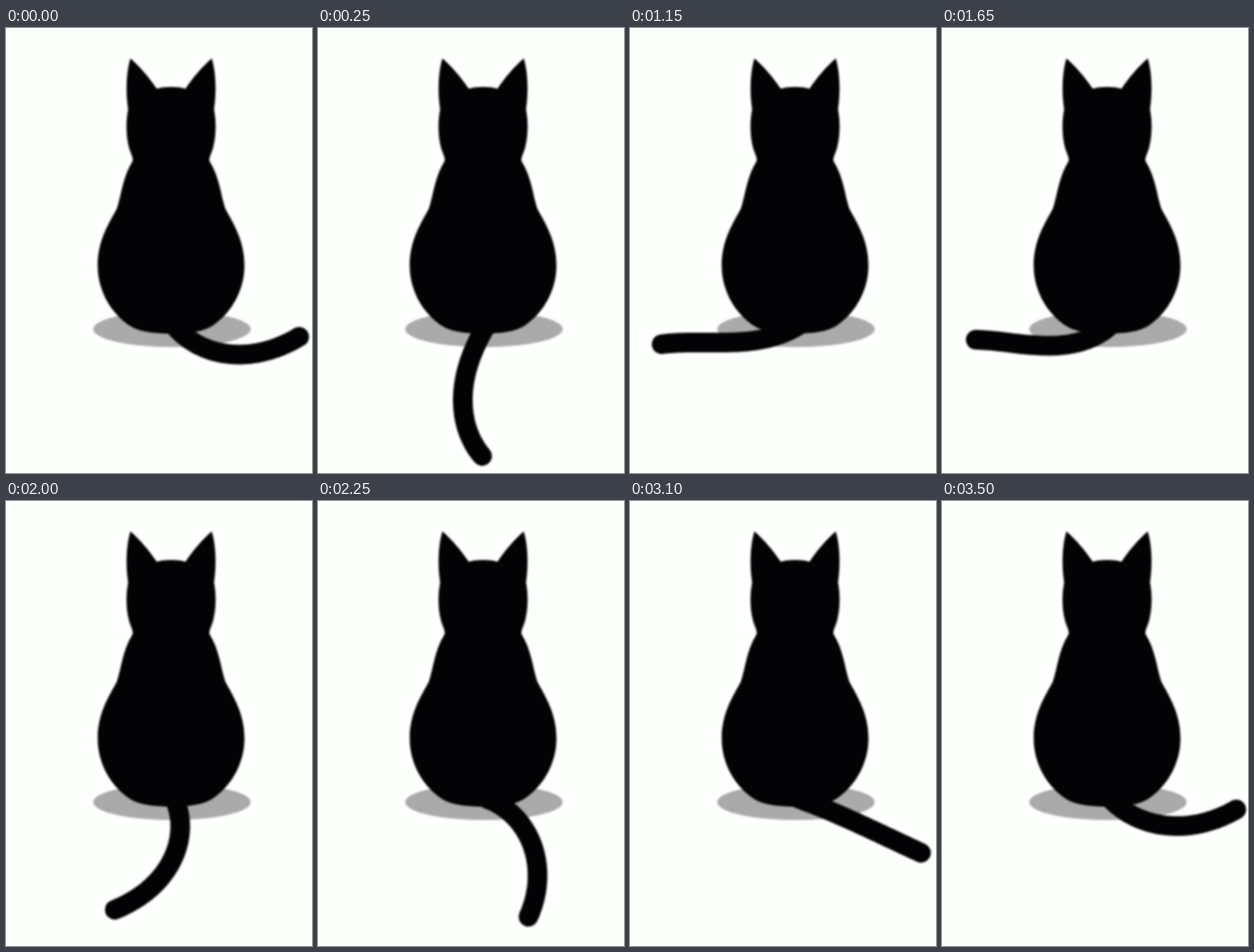
An HTML page that plays this animation: 342 px wide and 498 px high, repeating every 3550 ms.

```html
<!DOCTYPE html>
<html lang="en">
<head>
<meta charset="utf-8">
<title>Cat wagging its tail</title>
<style>
  html, body { margin: 0; width: 100%; height: 100%; overflow: hidden; background: #fdfffd; }
  svg { display: block; }
  .cat { filter: blur(1px); }
</style>
</head>
<body>
<svg width="342" height="498" viewBox="0 0 342 498">
  <g class="cat" fill="#030204">
    <ellipse cx="185.5" cy="337" rx="88" ry="20" fill="#aaa"/>
    <g transform="translate(184.5)">
      <path id="half" d="M-2 66 Q10 65.5 16 68 C24 56 35 43 45.5 34 C50 49 51 71 48 91
        C51 107 50 122 47 134 C45 141 42 145 43 149 C54 167 55 184 60.5 202
        C69 218 82 237 82 266 C82 292 69 317 48 332 C37 340 20 342 -2 342Z"/>
      <use href="#half" transform="scale(-1 1)"/>
    </g>
    <path id="tail" fill="none" stroke="#030204" stroke-width="22" stroke-linecap="round" stroke-linejoin="round"/>
  </g>
</svg>
<script>
const LOOP = 3550, STEP = 50, SEGMENTS = 40;
const ROOT = { x: 188, y: 333 };

// Headings in degrees: 0 points right, 90 down, 180 left.
const poses = [
  { time: 0, length: 153, root: 51, mid: 3, tip: -31 },
  { time: 225, length: 156, root: 115, mid: 85, tip: 39 },
  { time: 450, length: 156, root: 153, mid: 167, tip: 138 },
  { time: 1700, length: 156, root: 136, mid: 181, tip: 182 },
  { time: 2000, length: 158, root: 65, mid: 121, tip: 158 },
  { time: 2250, length: 158, root: 19, mid: 72, tip: 114 },
  { time: 2700, length: 149, root: 9, mid: 53, tip: 88 }
];

function poseAt(i) {
  const n = poses.length, turn = Math.floor(i / n), pose = poses[i - turn * n];
  return { ...pose, time: pose.time + turn * LOOP };
}

// Monotone cubic interpolation, so a pose never overshoots its neighbours.
function blend(t) {
  const i = poses.findLastIndex(pose => pose.time <= t);
  const [a, b, c, d] = [-1, 0, 1, 2].map(k => poseAt(i + k));
  const span = c.time - b.time, u = (t - b.time) / span;
  const slope = (p, q, key) => (q[key] - p[key]) / (q.time - p.time);
  const tangent = (m, n) => m * n > 0 ? 2 * m * n / (m + n) : 0;
  const ease = key => {
    const middle = slope(b, c, key), rise = c[key] - b[key];
    const start = tangent(slope(a, b, key), middle) * span;
    const end = tangent(middle, slope(c, d, key)) * span;
    return b[key] + u * (start + u * (3 * rise - 2 * start - end + u * (start + end - 2 * rise)));
  };
  return { length: ease('length'), root: ease('root'), mid: ease('mid'), tip: ease('tip') };
}

// The heading follows a parabola along the tail, through root, mid and tip.
function tailPath(t) {
  const { length, root, mid, tip } = blend(t);
  let { x, y } = ROOT, path = `M${x} ${y}`;
  for (let i = 0; i < SEGMENTS; i++) {
    const s = (i + .5) / SEGMENTS;
    const heading = root + (4 * mid - 3 * root - tip) * s + 2 * (root + tip - 2 * mid) * s * s;
    const angle = heading * Math.PI / 180;
    x += Math.cos(angle) * length / SEGMENTS;
    y += Math.sin(angle) * length / SEGMENTS;
    path += `L${x.toFixed(2)} ${y.toFixed(2)}`;
  }
  return path;
}

const tail = document.getElementById('tail');
const begin = performance.now();
function draw() {
  const t = Math.max(0, performance.now() - begin) % LOOP;
  tail.setAttribute('d', tailPath(Math.floor(t / STEP) * STEP));
  requestAnimationFrame(draw);
}
draw();
</script>
</body>
</html>
```
